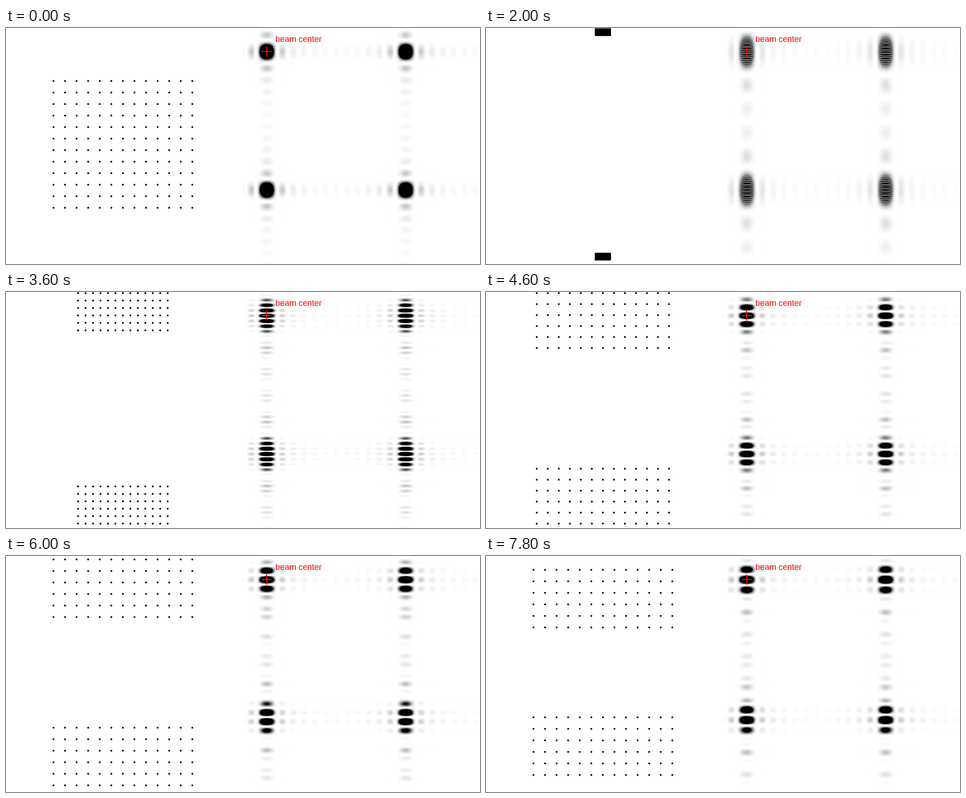
A matplotlib script for the animation above (8000 ms loop, 1024 px wide and 512 px high).

```python
import numpy as np
import matplotlib.pyplot as plt
from matplotlib.animation import FuncAnimation
from matplotlib.collections import PolyCollection

W, H, DPI = 1024, 512, 64
PX = 72 / DPI                 # points per pixel
STEP_MS, FRAMES = 200, 40
COLS, HALF = 13, 6            # atoms per row, rows in each half of the crystal
MID, MAX_CELL, FIT = 252.5, 25, 500
ATOM_RADIUS = 2
BEAM, ORDER = 51, 300         # beam pixel inside the detector, pixels per order
GAIN = 4.5                    # detector overexposure


def gap_at(k):
    """Gap between the two halves, in lattice cells."""
    if k <= 18:
        return 21 + 20 * (18 - k)
    if k <= 23:
        return 11 + 2 * (23 - k)
    return 11 - 0.2 * (k - 23)


def rows_at(k):
    """Row positions in lattice cells, centred on zero."""
    rows = np.arange(HALF, dtype=float)
    if 3 <= k < 6:            # one half alone
        return rows - rows.mean()
    gap = 1 if k < 3 else gap_at(k)
    rows = np.concatenate([rows, rows + HALF - 1 + gap])
    return rows - rows.mean()


def diffraction(positions):
    q = (np.arange(H) - BEAM) / ORDER
    return np.abs(np.exp(2j * np.pi * np.outer(q, positions)).sum(axis=1)) ** 2


columns = np.arange(COLS) - (COLS - 1) / 2
across = diffraction(columns) / COLS ** 2
angle = np.linspace(0, 2 * np.pi, 24, endpoint=False)
disc = ATOM_RADIUS * np.column_stack([np.cos(angle), np.sin(angle)])

fig = plt.figure(figsize=(W / DPI, H / DPI), dpi=DPI, facecolor="white")
ax = fig.add_axes([0, 0, 1, 1])
ax.set_axis_off()

detector = ax.imshow(np.ones((H, H)), cmap="gray", vmin=0, vmax=1,
                     extent=(W - H, W, H, 0), interpolation="nearest", aspect="auto")
# Polygons keep subpixel positions, which scatter markers round away.
atoms = ax.add_collection(PolyCollection([], facecolors="black", linewidths=0))

cx, cy = W - H + BEAM, BEAM
for xs, ys in (([cx - 11, cx + 11], [cy, cy]), ([cx, cx], [cy - 11, cy + 11])):
    ax.plot(xs, ys, color="red", lw=2 * PX, solid_capstyle="butt")
ax.text(582, 30, "beam center", color="red", family="Liberation Sans",
        size=18 * PX, va="baseline")
ax.set_xlim(0, W)
ax.set_ylim(H, 0)


def draw(k):
    rows = rows_at(k)
    cell = min(MAX_CELL, FIT / np.ptp(rows))
    x, y = np.meshgrid(columns, rows)
    centres = MID + cell * np.column_stack([x.ravel(), y.ravel()])
    atoms.set_verts(centres[:, None] + disc)
    down = diffraction(rows) / (2 * HALF) ** 2
    detector.set_data(1 - np.clip(GAIN * np.outer(down, across), 0, 1))
    return detector, atoms


anim = FuncAnimation(fig, draw, frames=FRAMES, interval=STEP_MS,
                     repeat=True, repeat_delay=0)
plt.show()
```
